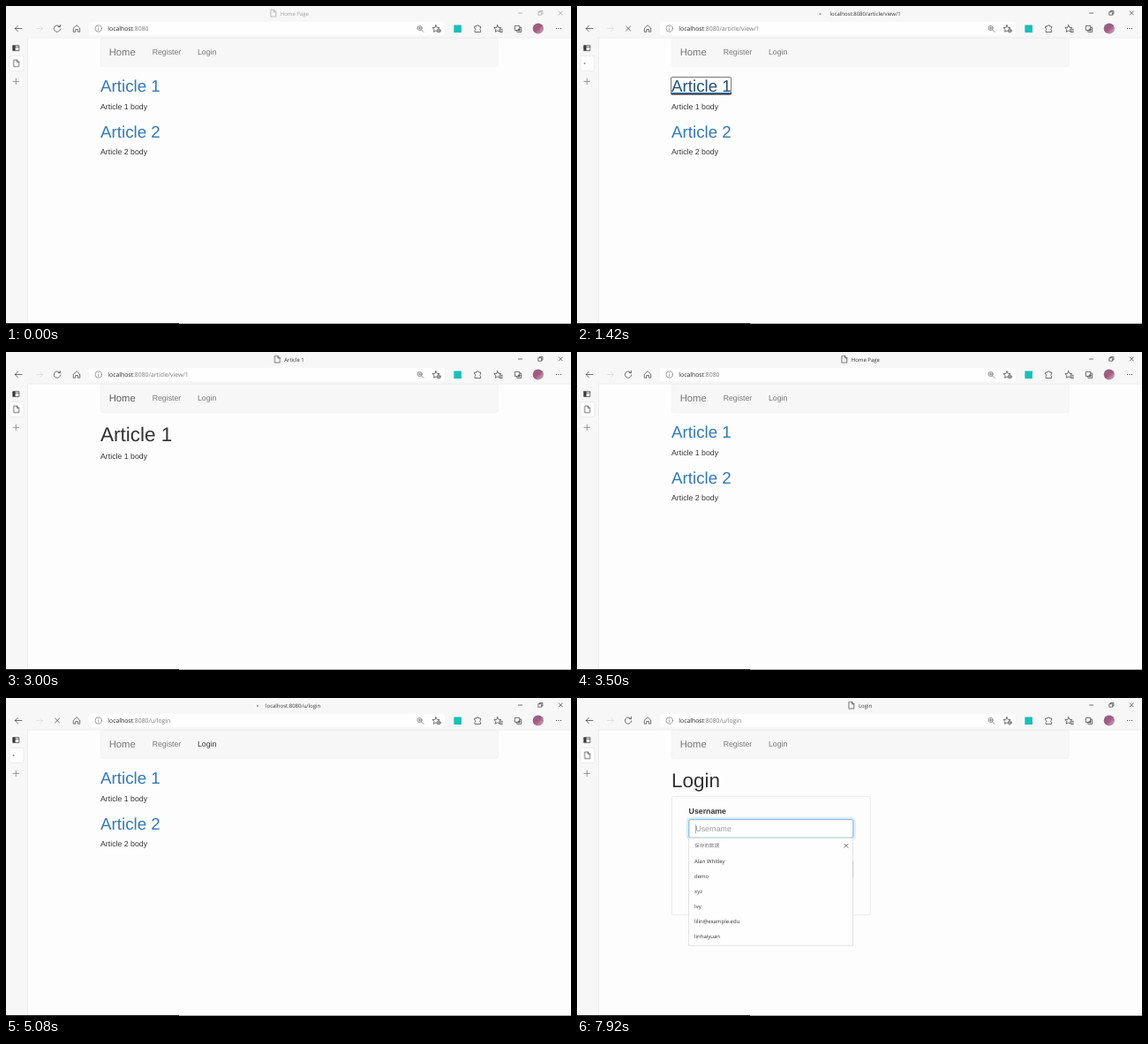
These frames come from a looping animation (640 px wide and 360 px high, 8 s). An HTML page:

```html
<!DOCTYPE html>
<html lang="en">
<head>
<meta charset="utf-8">
<title>Browser walk-through</title>
<style>
  html, body { margin: 0; width: 100%; height: 100%; overflow: hidden; background: #fdfdfd; }
  svg { display: block; width: 100vw; height: 100vh; text-rendering: geometricPrecision; }

  text { fill: #333; }
  .page text { font: 8.75px "Liberation Sans", Arial, sans-serif; }
  .page .h1 { font-size: 22.5px; }
  .page .h2 { font-size: 18.75px; fill: #337ab7; }
  .page .brand { font-size: 11.25px; }
  .page .label { font-weight: bold; }
  .nav text { fill: #777; }
  .page .hint { fill: #999; }
  .ui text, .page .list text { font: 6px "Open Sans", "Noto Sans", sans-serif; }
  .ui .url text { font-size: 6.85px; fill: #777; }
  .ui .url .host { fill: #222; }
  .page .list .cjk { font: 5.6px "Noto Sans CJK SC", "Noto Sans CJK", sans-serif; fill: #767676; }
  .line { fill: none; stroke: #3a3a3a; stroke-width: .7; stroke-linecap: round; stroke-linejoin: round; }

  /* every change is a hard cut */
  .anim, .load, .done {
    animation: 8s -4ms step-end infinite;
  }
  .load { animation-name: load; }
  .done { animation-name: done; }
  .window { animation-name: window; }
  .at-home { animation-name: at-home; }
  .at-article { animation-name: at-article; }
  .at-login { animation-name: at-login; }
  .to-home { animation-name: to-home; }
  .to-article { animation-name: to-article; }
  .to-login { animation-name: to-login; }
  .url-home { animation-name: url-home; }
  .url-article { animation-name: url-article; }
  .url-login { animation-name: url-login; }
  .title-home { animation-name: title-home; }
  .title-article { animation-name: title-article; }
  .link1 { animation-name: link1; }
  .link2 { animation-name: link2; }
  .ring { animation-name: ring; }
  .brand { animation-name: brand; }
  .nav-login { animation-name: nav-login; }
  .tip-article { animation-name: tip-article; }
  .tip-login { animation-name: tip-login; }
  .list { animation-name: list; }
  .glow { animation-name: glow; }
  .caret { animation-name: caret; }

  @keyframes load {
    0%, 20.875%, 43.75%, 66.625% { opacity: 0 }
    16.625%, 41.625%, 62.5% { opacity: 1 }
  }
  @keyframes done {
    0%, 20.875%, 43.75%, 66.625% { opacity: 1 }
    16.625%, 41.625%, 62.5% { opacity: 0 }
  }
  @keyframes window { 0% { opacity: .45 } 16.625% { opacity: 1 } }

  @keyframes at-home { 0%, 43.75% { opacity: 1 } 18.75%, 64.625% { opacity: 0 } }
  @keyframes at-article { 0%, 43.75% { opacity: 0 } 18.75% { opacity: 1 } }
  @keyframes at-login { 0% { opacity: 0 } 64.625% { opacity: 1 } }

  @keyframes to-article { 0%, 18.75% { opacity: 0 } 16.625% { opacity: 1 } }
  @keyframes to-home { 0%, 43.75% { opacity: 0 } 41.625% { opacity: 1 } }
  @keyframes to-login { 0%, 64.625% { opacity: 0 } 62.5% { opacity: 1 } }

  @keyframes url-home { 0%, 41.625% { opacity: 1 } 16.625%, 62.5% { opacity: 0 } }
  @keyframes url-article { 0%, 41.625% { opacity: 0 } 16.625% { opacity: 1 } }
  @keyframes url-login { 0% { opacity: 0 } 62.5% { opacity: 1 } }
  @keyframes title-home { 0%, 43.75% { opacity: 1 } 16.625%, 62.5% { opacity: 0 } }
  @keyframes title-article { 0%, 41.625% { opacity: 0 } 18.75% { opacity: 1 } }

  @keyframes link1 {
    0%, 18.75% { fill: #337ab7; text-decoration-line: none }
    10.375% { fill: #23527c; text-decoration-line: underline }
  }
  @keyframes link2 {
    0%, 2.125% { fill: #337ab7; text-decoration-line: none }
    1% { fill: #23527c; text-decoration-line: underline }
  }
  @keyframes ring { 0%, 18.75% { opacity: 0 } 11.5% { opacity: 1 } }
  @keyframes brand {
    0%, 43.75%, 51% { fill: #777 }
    36.5%, 47.875% { fill: #5e5e5e }
  }
  @keyframes nav-login { 0%, 64.625% { fill: #777 } 52.125% { fill: #333 } }

  @keyframes tip-article { 0%, 16.625% { opacity: 0 } 14.625% { opacity: 1 } }
  @keyframes tip-login {
    0%, 62.5% { opacity: 0 }
    56.25% { opacity: .35 }
    57.25% { opacity: .7 }
    58.375% { opacity: 1 }
  }

  @keyframes list { 0% { opacity: 0 } 72.875% { opacity: 1 } }
  @keyframes glow { 0% { opacity: 0 } 74% { opacity: 1 } }
  @keyframes caret {
    0%, 79.125%, 92.75% { opacity: 0 }
    72.875%, 86.5%, 99% { opacity: 1 }
  }
</style>
</head>
<body>
<svg viewBox="0 0 640 360" preserveAspectRatio="none">
  <defs>
    <g id="doc" class="line">
      <path d="M-2.7-3.8h3.2l2.3 2.3v5.3h-5.5zM.5-3.8v2.3h2.3"/>
    </g>
    <circle id="dot" cx="-3.2" r=".75" fill="#333"/>
    <path id="star" d="M0-4l1.2 2.6 2.8.3-2.1 1.9.6 2.8L0 2.2l-2.5 1.4.6-2.8L-4-1.1l2.8-.3z"/>
    <linearGradient id="photo" x2="1" y2="1">
      <stop offset="0" stop-color="#7d6a94"/>
      <stop offset=".5" stop-color="#a8587c"/>
      <stop offset="1" stop-color="#cdbac8"/>
    </linearGradient>
  </defs>

  <rect width="640" height="360" fill="#fdfdfd"/>

  <g class="page">
    <rect x="107.3" y="36.4" width="450" height="32" rx="2" fill="#f7f7f7" stroke="#eee" stroke-width=".6"/>
    <g class="nav">
      <text class="anim brand" x="116.7" y="55.9">Home</text>
      <text x="165.7" y="55">Register</text>
      <text class="anim nav-login" x="217" y="55">Login</text>
    </g>

    <g class="anim at-home">
      <text class="h2 anim link1" x="107" y="97.1">Article 1</text>
      <rect class="anim ring" x="106.6" y="80.6" width="68" height="20" rx="1" fill="none" stroke="#333" stroke-width=".7"/>
      <text x="107" y="116.6">Article 1 body</text>
      <text class="h2 anim link2" x="107" y="149.1">Article 2</text>
      <text x="107" y="168.3">Article 2 body</text>
    </g>

    <g class="anim at-article">
      <text class="h1" x="107" y="100.7">Article 1</text>
      <text x="107" y="120.9">Article 1 body</text>
    </g>

    <g class="anim at-login">
      <text class="h1" x="107" y="100.7">Login</text>
      <rect x="107.3" y="111.4" width="225" height="134" rx="2" fill="none" stroke="#e6e6e8" stroke-width=".8"/>
      <text class="label" x="126.6" y="130.6">Username</text>
      <text class="label" x="126.6" y="176.9">Password</text>
      <g fill="#fefefe" stroke="#d2d2c8" stroke-width=".8">
        <rect x="126.8" y="137.6" width="186" height="20.6" rx="2"/>
        <rect x="126.8" y="183.6" width="186" height="20.6" rx="2"/>
        <rect x="126.8" y="214.3" width="34" height="20.6" rx="2"/>
      </g>
      <g class="anim glow" fill="none" stroke="#66afe9">
        <rect x="125.2" y="136" width="189.2" height="23.8" rx="4" stroke-width="3" opacity=".2"/>
        <rect x="126.8" y="137.6" width="186" height="20.6" rx="2" stroke-width=".9" opacity=".85"/>
      </g>
      <text class="hint" x="134.4" y="150.9">Username</text>
      <text class="hint" x="134.4" y="196.9">Password</text>
      <text x="132" y="227.6">Login</text>
      <rect class="anim caret" x="134.1" y="143.4" width=".6" height="10" fill="#777"/>

      <g class="anim list">
        <rect x="126.7" y="158.6" width="185.8" height="121.6" fill="#fefefe" stroke="#dadada" stroke-width=".8"/>
        <path d="M312.6 184v20" stroke="#c4c4c4" stroke-width=".8"/>
        <text class="cjk" x="133.3" y="169.3">保存的数据</text>
        <path class="line" d="M302.8 165.2l4.2 4.2m0-4.2l-4.2 4.2"/>
        <text x="133" y="187">Alan Whitley</text>
        <text x="133" y="204">demo</text>
        <text x="133" y="221">xyz</text>
        <text x="133" y="238">Ivy</text>
        <text x="133" y="255">lilin@example.edu</text>
        <text x="133" y="272">linhaiyuan</text>
      </g>
    </g>
  </g>

  <g class="ui">
    <path d="M0 0h640v36H24.5v324H0z" fill="#f7f7f7"/>
    <path d="M24.5 360V36H640" fill="none" stroke="#eaeaea" stroke-width=".8"/>
    <rect x="94" y="18" width="403" height="15" rx="2" fill="#fefefe"/>
    <rect x="4" y="56.5" width="16" height="17" rx="1.5" fill="#fefefe" stroke="#e2e2e2" stroke-width=".6"/>

    <g class="anim window">
      <g class="anim title-home">
        <use href="#doc" class="done" x="303" y="8.3"/>
        <text x="310.8" y="10.6">Home Page</text>
      </g>
      <g class="anim to-article">
        <use href="#dot" class="load" x="278.7" y="9"/>
        <text x="286.5" y="10.6">localhost:8080/article/view/1</text>
      </g>
      <g class="anim title-article">
        <use href="#doc" class="done" x="307.5" y="8.3"/>
        <use href="#dot" class="load" x="307.5" y="9"/>
        <text x="315.2" y="10.6">Article 1</text>
      </g>
      <g class="anim to-home">
        <use href="#dot" class="load" x="298.5" y="9"/>
        <text x="306.3" y="10.6">localhost:8080</text>
      </g>
      <g class="anim to-login">
        <use href="#dot" class="load" x="288.2" y="9"/>
        <text x="294" y="10.6">localhost:8080/u/login</text>
      </g>
      <g class="anim at-login">
        <use href="#doc" class="done" x="311" y="8.3"/>
        <use href="#dot" class="load" x="311" y="9"/>
        <text x="319" y="10.6">Login</text>
      </g>
      <path class="line" stroke-width=".6" d="M580.5 8h4M603.2 6.7h3.5v3.5h-3.5zM604.4 6.5v-1h3.5v3.5h-1M626.2 5.8l4.2 4.2m0-4.2l-4.2 4.2"/>
    </g>

    <g class="line">
      <path d="M18 25.5h-7.8m3.2-3.2l-3.2 3.2 3.2 3.2"/>
      <path d="M34.5 25.5h7m-3-3l3 3-3 3" stroke="#dadada"/>
      <path class="done" d="M61 23.4A3.7 3.7 0 1 0 61.7 26M61.4 21.4v2.2h-2.2"/>
      <path class="load" d="M55.6 23l5 5m0-5l-5 5"/>
      <path d="M76.6 25l3.5-3.3 3.5 3.3v4.2h-2.2v-2.7h-2.6v2.7h-2.2z"/>
      <g stroke="#777">
        <circle cx="104.7" cy="25.5" r="3.7"/>
        <path d="M104.7 25.2v2.2m0-3.9v.1"/>
      </g>
      <g stroke="#666">
        <circle cx="468.6" cy="25" r="2.6"/>
        <path d="M470.6 27l2.4 2.4M467.4 25h2.4m-1.2-1.2v2.4"/>
      </g>
      <use href="#star" x="487" y="25.7"/>
      <circle cx="490.3" cy="28" r="2" fill="#fefefe" stroke-width=".6"/>
      <path d="M489.3 28h2m-1-1v2" stroke-width=".6"/>
      <path d="M531 23h2a1.3 1.3 0 0 1 2.6 0h2v2.2a1.3 1.3 0 0 0 0 2.4v1.9h-6.6v-2a1.3 1.3 0 0 0 0-2.4z"/>
      <use href="#star" x="556.8" y="25.7"/>
      <path d="M560 26.3h2.3M559.8 28h2.5M560 29.6h2.3"/>
      <path d="M576.8 22.4h5v5h-5zM578.8 27.6v1.8h4.9v-5.2h-1.7M581.2 25.6v2.6m-1.3-1.3h2.6"/>
      <path d="M8 44.6h6.8v6H8zM8 46.4h6.8"/>
      <path d="M8 85.4h6.6m-3.3-3.3v6.6" stroke="#777"/>
    </g>
    <rect x="8" y="44.8" width="2.6" height="5.6" fill="#3a3a3a"/>
    <rect x="507.3" y="21.5" width="8.6" height="8.6" fill="#19bfb9"/>
    <circle cx="602.8" cy="25.5" r="6.1" fill="url(#photo)"/>
    <path d="M623.5 25.5h.1m2.4 0h.1m2.4 0h.1" stroke="#333" stroke-width="1.1" stroke-linecap="round"/>
    <use href="#doc" class="done" x="11.8" y="64.8"/>
    <use href="#dot" class="load" x="11.8" y="65"/>

    <g class="url">
      <text class="anim url-home" x="115.3" y="28"><tspan class="host">localhost</tspan>:8080</text>
      <text class="anim url-article" x="115.3" y="28"><tspan class="host">localhost</tspan>:8080/article/view/1</text>
      <text class="anim url-login" x="115.3" y="28"><tspan class="host">localhost</tspan>:8080/u/login</text>
    </g>

    <path d="M0 359.5h640" stroke="#a6a6a6"/>
    <path d="M0 359.5h196" stroke="#1c1c1c"/>

    <g fill="#f7f7f7" stroke="#d6d6d6" stroke-width=".6">
      <g class="anim tip-article">
        <path d="M24 359V348h81a2 2 0 0 1 2 2v9z"/>
        <text x="25.6" y="355.6" stroke="none">localhost:8080/article/view/1</text>
      </g>
      <g class="anim tip-login">
        <path d="M24 359V348h63a2 2 0 0 1 2 2v9z"/>
        <text x="25.6" y="355.6" stroke="none">localhost:8080/u/login</text>
      </g>
    </g>
  </g>
</svg>
</body>
</html>
```
